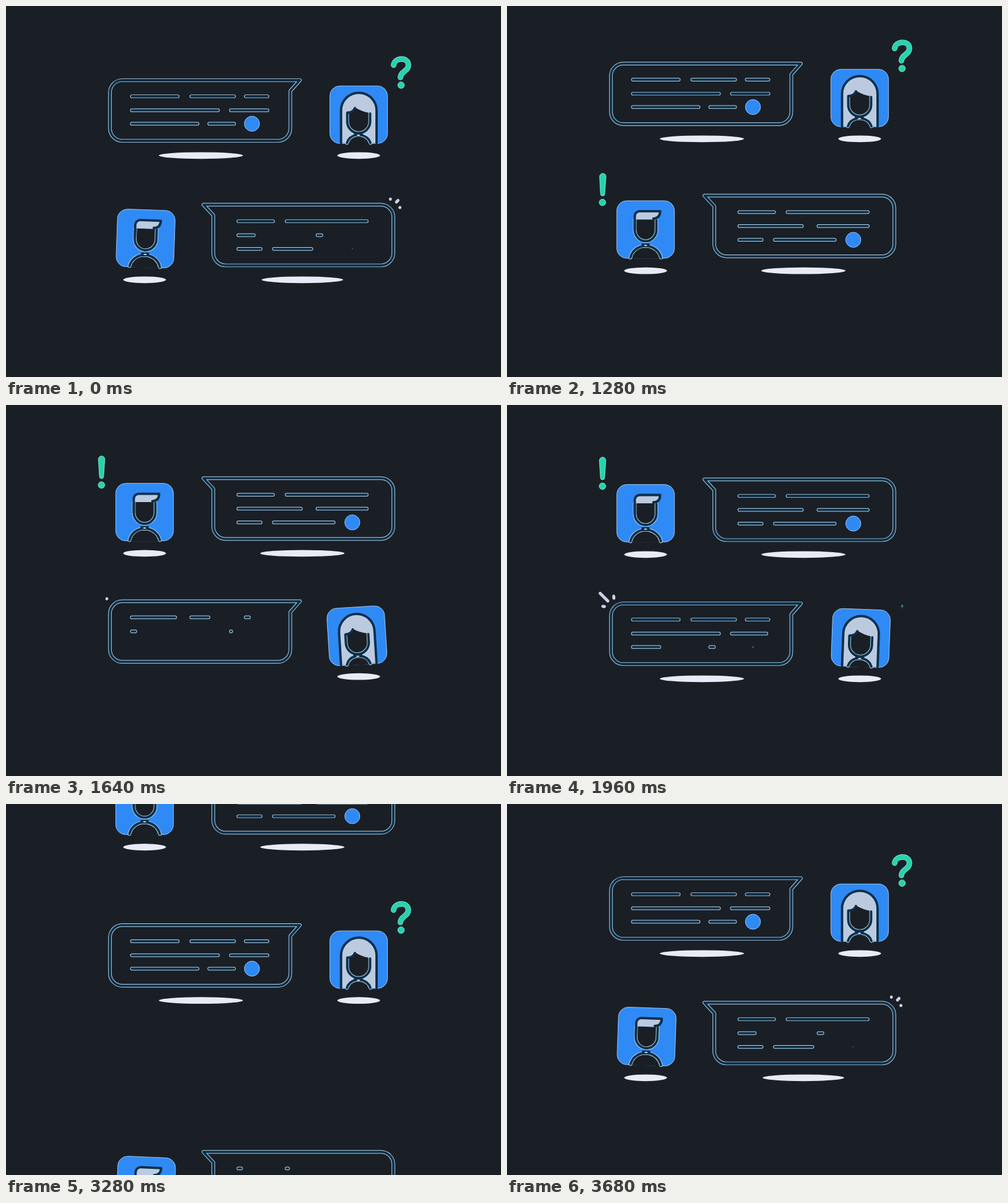
These frames come from a looping animation (800 px wide and 600 px high, 3.72 s). An HTML page:

```html
<!DOCTYPE html>
<html lang="en">
<head>
<meta charset="utf-8">
<title>Chat</title>
<style>
html, body { margin: 0; width: 100%; height: 100%; overflow: hidden; background: #1a1f26; }
svg { display: block; width: 800px; height: 600px; }
path { fill: none; stroke-linecap: round; stroke-linejoin: round; }
.halo { stroke: #b8d4e6; stroke-width: 5.7; }
.core { stroke: #0b2f4a; stroke-width: 3.8; }
.tile, .dot { fill: #2f8af5; stroke: #a9cdf9; stroke-width: 0.9; }
.hair { fill: #bccae0; }
.skin { fill: #1a1f26; }
.shadow { fill: #e8ebf6; }
.spark { stroke: #cbd3e6; stroke-width: 4.8; }
.sign { fill: #26d3ae; stroke: #9cecd9; stroke-width: 0.8; }
.rim { stroke: #9cecd9; stroke-width: 8.8; }
.hook { stroke: #26d3ae; stroke-width: 7.4; }
</style>
</head>
<body>
<svg id="stage" viewBox="0 0 800 600"></svg>
<script>
const NS = 'http://www.w3.org/2000/svg';
const LOOP = 3720, STEP = 40, CYCLE = 3680, HALF = CYCLE / 2;
const GAP = 201, MOVE = 573, SETTLE = 140;

const clamp = u => Math.max(0, Math.min(1, u));
const inOut = u => (u = clamp(u)) < 0.5 ? 4 * u ** 3 : 1 - 4 * (1 - u) ** 3;
const smooth = u => (u = clamp(u), u * u * (3 - 2 * u));
const easeIn = u => clamp(u) ** 5;
const easeOut = u => 1 - (1 - clamp(u)) ** 5;
const mod = (a, n) => ((a % n) + n) % n;

function add(parent, name, attrs = {}) {
  const el = document.createElementNS(NS, name);
  for (const k in attrs) el.setAttribute(k, attrs[k]);
  parent.appendChild(el);
  return el;
}
const shape = (parent, cls, d) => add(parent, 'path', { class: cls, d });
const ink = (parent, d) => ['halo', 'core'].map(c => shape(parent, c, d));
const show = (el, on) => el.setAttribute('display', on ? 'inline' : 'none');

// Text strokes are [x1, x2, y], listed in typing order.
const GIRL = {
  start: 1130, tileX: 523, tileY: 129, bubbleX: 315,
  bubble: 'M188 120H475L459.5 137.5V198a20 20 0 0 1-20 20H188a20 20 0 0 1-20-20V140a20 20 0 0 1 20-20Z',
  text: [[203.5, 277.5, 146], [299.5, 368.5, 146], [387.5, 422.5, 146],
    [203.5, 342.5, 168.7], [363.5, 422.5, 168.7],
    [203.5, 309.5, 190.4], [328.5, 368.5, 190.4]],
  dot: [397.5, 190.4],
  sparkX: x => x,
  pivot: [638.5, 127],
  face(g) {
    const hair = 'M541.5 221.5V169a28.7 28.7 0 0 1 57.4 0V221.5';
    shape(g, 'hair', hair);
    shape(g, 'skin', 'M551.5 172Q560 172 564 164Q575 171 588.5 173V187a18.5 18.5 0 0 1-37 0Z');
    shape(g, 'skin', 'M551 223Q554 211 566 209H573Q586 211 589 223Z');
    shape(g, 'core', hair);
    ink(g, 'M551.5 174V187a18.5 18.5 0 0 0 37 0V174');
    shape(g, 'core', 'M551.5 172.5Q561 172.5 564 165');
    ink(g, 'M551 221.5Q554 211 566 208.5H573Q586 211 589 221.5');
    shape(g, 'core', 'M564 207H575');
    add(g, 'ellipse', { cx: 569.5, cy: 209, rx: 2.6, ry: 1, fill: '#d5dfeb' });
  },
  sign(g) {
    const hook = 'M626.5 95.5C628 83 650 82 650.4 95.5C650.4 106 638 105 637.5 115.5';
    shape(g, 'rim', hook);
    shape(g, 'hook', hook);
    add(g, 'circle', { class: 'sign', cx: 638.5, cy: 128, r: 5.3 });
  }
};

const BOY = {
  start: 1130 + HALF, tileX: 177, tileY: 128.3, bubbleX: 479,
  bubble: 'M319 120.3H606a20 20 0 0 1 20 20V198.5a20 20 0 0 1-20 20H355a20 20 0 0 1-20-20V137.5Z',
  text: [[375.5, 431.5, 147], [453.5, 583, 147],
    [375.5, 411.5, 191.8], [433, 529.5, 191.8],
    [375.5, 476.5, 169.6], [503.5, 583, 169.6]],
  dot: [559.7, 191.8],
  sparkX: x => 794 - x,
  pivot: [154.3, 130.5],
  face(g) {
    shape(g, 'skin', 'M206.5 159H241.5V176a17.5 18 0 0 1-35 0Z');
    shape(g, 'skin', 'M199.5 222.5Q203 206 219 202H229Q245 206 248.8 222.5Z');
    shape(g, 'hair', 'M206.5 159V153a8 8 0 0 1 8-8H248Q248 159 236 159Z');
    ink(g, 'M206.5 160V176a17.5 18 0 0 0 35 0V160');
    shape(g, 'core', 'M206.5 176V153.5a8 8 0 0 1 8-8H247.5Q247.5 157 236.5 157.5');
    ink(g, 'M199.5 220.5Q203 206 219 202H229Q245 206 248.8 220.5');
    shape(g, 'core', 'M219 199.5H229');
    add(g, 'ellipse', { cx: 224, cy: 200.8, rx: 2.6, ry: 1, fill: '#d5dfeb' });
  },
  sign(g) {
    shape(g, 'sign', 'M149.3 89.5a5.2 5.2 0 0 1 10.4 0L157.8 117.5a3.4 3.4 0 0 1-6.8 0Z');
    add(g, 'circle', { class: 'sign', cx: 154.3, cy: 131.3, r: 5.3 });
  }
};

// Each spark: inner end, outer end, delay.
const SPARKS = [[163, 116, 150.5, 103.5, 395], [172.8, 111.5, 171.5, 99, 500], [157.5, 125, 147.5, 123.7, 500]];

// Vertical offset from the upper slot: arrive, step up, leave.
function rowY(t) {
  const arrive = 635 - 642 * inOut(t / MOVE) + 7 * smooth((t - MOVE) / SETTLE);
  const b = t - HALF, c = t - CYCLE;
  const step = (GAP + 3) * inOut(b / MOVE) - 3 * smooth((b - MOVE) / SETTLE);
  return GAP + arrive - step - 258 * inOut((c + 28) / 600);
}

function tileTilt(t) {
  const fade = t < 500 ? 1 : clamp(1 - (t - 500) / 1200);
  return 3.6 * fade * Math.cos(2 * Math.PI * (t - 240) / 540);
}

function signTilt(t) {
  const x = t - 1045;
  return x < 0 ? 0 : 3 * clamp(1 - x / 1200) * Math.sin(2 * Math.PI * x / 400);
}

function makeRow(svg, kind) {
  const row = add(svg, 'g');
  const midX = kind.tileX + 47;
  const shadow = cx => add(row, 'ellipse', { class: 'shadow', cx, cy: 241.8, ry: 5.4 });
  const tileShadow = shadow(midX), bubbleShadow = shadow(kind.bubbleX);

  ink(row, kind.bubble);
  const lines = kind.text.map(() => ink(row, ''));
  const dot = add(row, 'circle', { class: 'dot', cx: kind.dot[0], cy: kind.dot[1] });
  const sparks = SPARKS.map(() => shape(row, 'spark', ''));

  const card = add(row, 'g');
  add(card, 'rect', { class: 'tile', x: kind.tileX + 0.4, y: kind.tileY + 0.3, width: 93.2, height: 93, rx: 16 });
  kind.face(card);

  const sign = add(row, 'g');
  kind.sign(sign);

  return t => {
    const on = t > 0 && t < CYCLE + 600;
    show(row, on);
    if (!on) return;
    row.setAttribute('transform', `translate(0 ${rowY(t).toFixed(2)})`);
    card.setAttribute('transform', `rotate(${tileTilt(t).toFixed(3)} ${midX} 222)`);
    tileShadow.setAttribute('rx', 34.6 * easeOut((t - 200) / 400));
    bubbleShadow.setAttribute('rx', 68 * easeOut((t - 510) / 400));

    const typed = i => easeIn((t - 80 * i) / 516);
    lines.forEach((pair, i) => {
      const [x1, x2, y] = kind.text[i], p = typed(i);
      for (const el of pair) {
        show(el, p > 0.001);
        el.setAttribute('d', `M${x1} ${y}H${x1 + (x2 - x1) * p + 0.01}`);
      }
    });
    dot.setAttribute('r', 12.2 * typed(lines.length));

    sparks.forEach((el, i) => {
      const [x1, y1, x2, y2, delay] = SPARKS[i];
      const head = easeIn((t - delay) / 430), tail = inOut((t - delay - 430) / 300);
      const at = p => `${kind.sparkX(x1 + (x2 - x1) * p)} ${y1 + (y2 - y1) * p}`;
      show(el, head > 0.001 && tail < 1);
      el.setAttribute('d', `M${at(tail)}L${at(head + 0.001)}`);
    });

    const size = 1.1 * inOut((t - 745) / 300) - 0.1 * smooth((t - 1045) / 250);
    const [px, py] = kind.pivot;
    show(sign, size > 0.01);
    sign.setAttribute('transform',
      `translate(${px} ${py}) rotate(${signTilt(t).toFixed(3)}) scale(${size.toFixed(4)}) translate(${-px} ${-py})`);
  };
}

const svg = document.getElementById('stage');
// Every kind needs two rows: one can leave while the next arrives.
const cast = [GIRL, BOY].map(kind => ({ kind, rows: [makeRow(svg, kind), makeRow(svg, kind)] }));

function draw(ms) {
  const t = Math.floor(mod(ms, LOOP) / STEP) * STEP % CYCLE;
  for (const { kind, rows } of cast) {
    const local = mod(t - kind.start + 100, CYCLE) - 100;
    rows.forEach((update, i) => update(local + i * CYCLE));
  }
}

let begin = null;
function tick(now) {
  if (begin === null) begin = now;
  draw(now - begin);
  requestAnimationFrame(tick);
}
draw(0);
requestAnimationFrame(tick);
</script>
</body>
</html>
```
